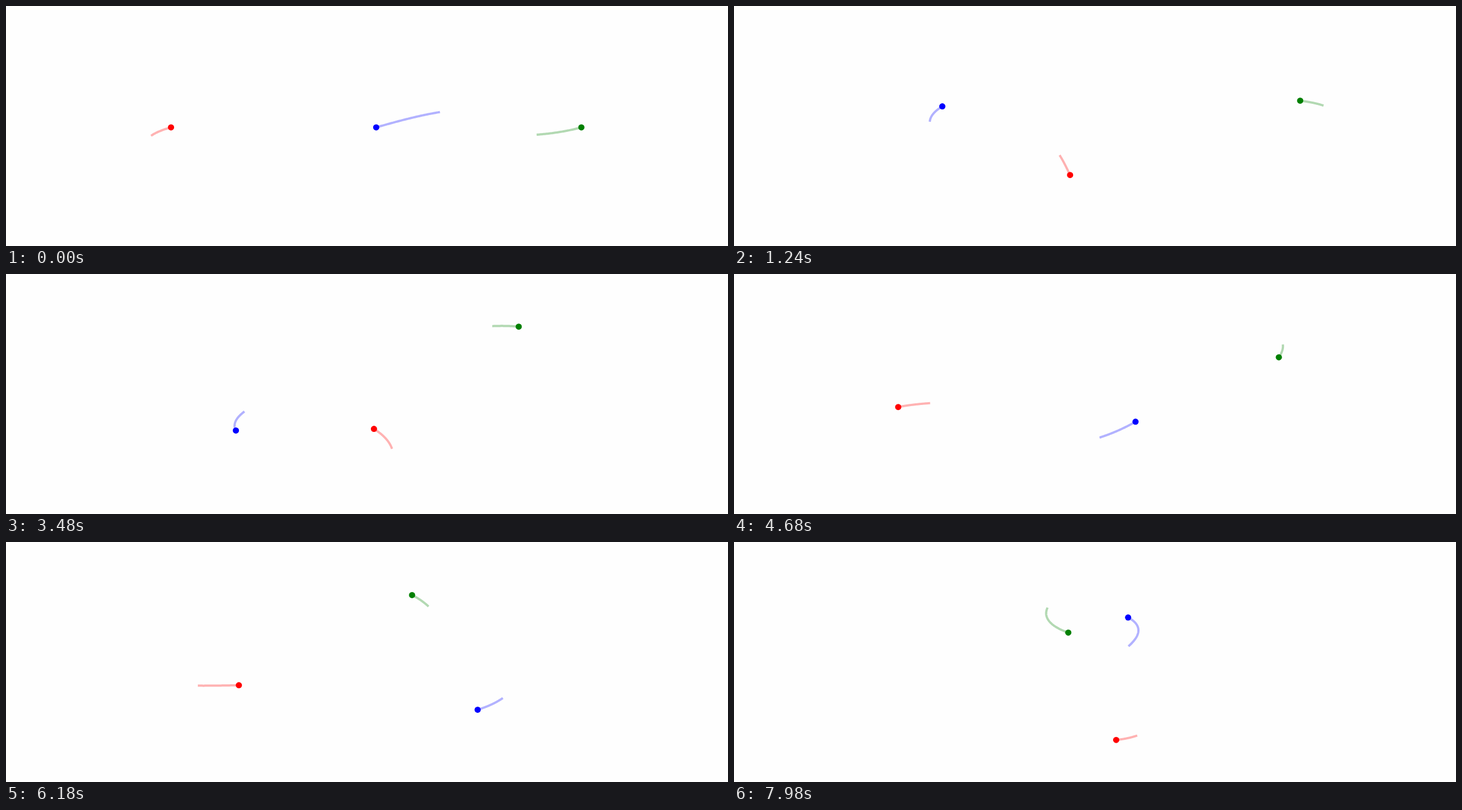
Write an HTML page with a canvas that moves like this. It is 1280 px wide and 427 px high and loops after 8 s.

```html
<!DOCTYPE html>
<html lang="en">
<head>
<meta charset="utf-8">
<title>Three-body orbit</title>
<style>
  html, body { margin: 0; width: 100%; height: 100%; overflow: hidden; background: #fefefe; }
  canvas { display: block; }
</style>
</head>
<body>
<canvas id="stage" width="1280" height="427"></canvas>
<script>
const ctx = document.getElementById('stage').getContext('2d');
const COLORS = ['#ff0000', '#0000ff', '#008000'];
const FRAME_MS = 20, LOOP_MS = 8000;
// One unit of orbit time lasts one second.
const STEPS_PER_MS = 2, STEP = 1 / (1000 * STEPS_PER_MS);
const TRAIL_STEPS = 300 * STEPS_PER_MS, TRAIL_STRIDE = 10;

// Equal masses, G = 1: the "moth I" periodic orbit, started on a line.
function integrate(steps) {
  const vx = 0.464445, vy = 0.39606;
  const pos = [[-1, 0], [0, 0], [1, 0]];
  const vel = [[vx, vy], [-2 * vx, -2 * vy], [vx, vy]];
  const kick = h => {
    for (const [a, b] of [[0, 1], [0, 2], [1, 2]]) {
      const dx = pos[b][0] - pos[a][0], dy = pos[b][1] - pos[a][1];
      const f = h / Math.hypot(dx, dy) ** 3;
      vel[a][0] += f * dx; vel[a][1] += f * dy;
      vel[b][0] -= f * dx; vel[b][1] -= f * dy;
    }
  };
  const path = [];
  for (let k = 0; k <= steps; k++) {
    path.push(pos.map(p => p.slice()));
    kick(STEP / 2);
    pos.forEach((p, i) => { p[0] += STEP * vel[i][0]; p[1] += STEP * vel[i][1]; });
    kick(STEP / 2);
  }
  return path;
}
const path = integrate(LOOP_MS * STEPS_PER_MS);

// Screen position; the orbit is point-symmetric about its start.
function at(body, k) {
  const [x, y] = k < 0 ? path[-k][2 - body].map(c => -c) : path[k][body];
  return [656.3 + 363.75 * x, 215.9 - 120.45 * y];
}

function draw(k) {
  ctx.fillStyle = '#fefefe';
  ctx.fillRect(0, 0, 1280, 427);
  ctx.lineWidth = 4;
  ctx.lineCap = 'square';
  ctx.lineJoin = 'round';
  ctx.globalAlpha = 0.3;
  COLORS.forEach((color, i) => {
    ctx.beginPath();
    for (let j = k - TRAIL_STEPS; j <= k; j += TRAIL_STRIDE) ctx.lineTo(...at(i, j));
    ctx.strokeStyle = color;
    ctx.stroke();
  });
  ctx.globalAlpha = 1;
  COLORS.forEach((color, i) => {
    ctx.beginPath();
    ctx.arc(...at(i, k), 5.5, 0, 2 * Math.PI);
    ctx.fillStyle = color;
    ctx.fill();
  });
}

const start = performance.now();
function tick() {
  const ms = (performance.now() - start) % LOOP_MS;
  draw(Math.floor(ms / FRAME_MS) * FRAME_MS * STEPS_PER_MS);
  requestAnimationFrame(tick);
}
tick();
</script>
</body>
</html>
```
